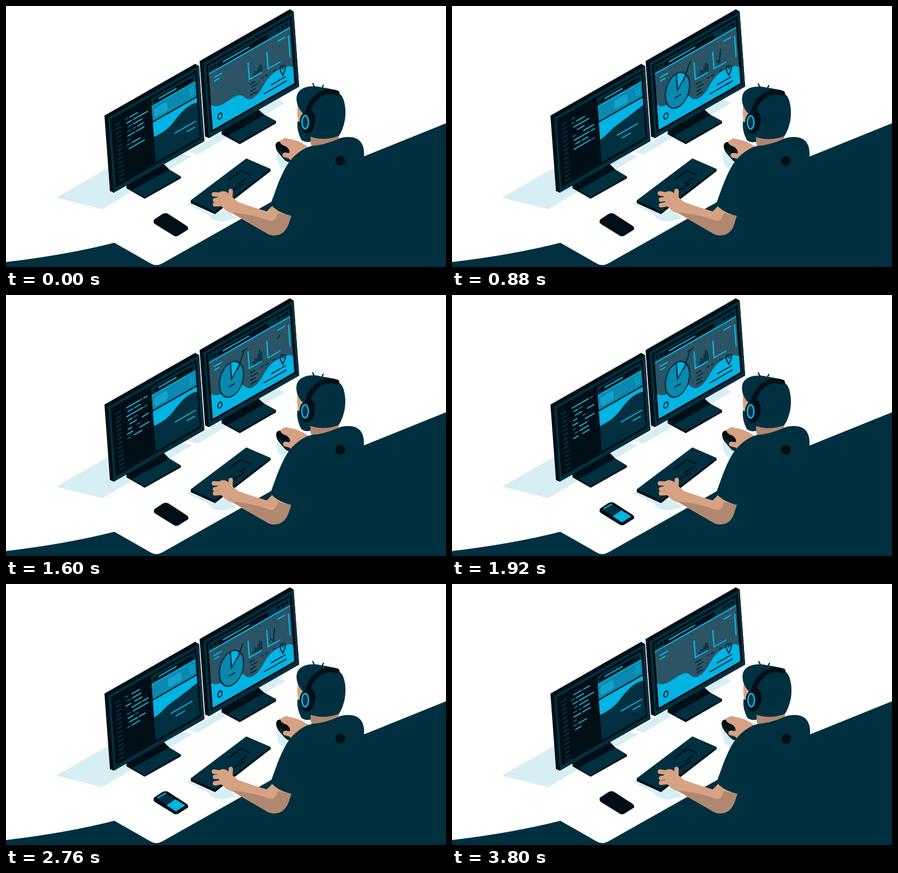
Animation, 800 px wide and 474 px high, one loop 3.84 s. Source, as an HTML page:

```html
<!DOCTYPE html>
<html lang="en">
<head>
<meta charset="utf-8">
<title>Developer at a desk</title>
<style>
html, body { margin: 0; width: 100%; height: 100%; overflow: hidden; background: #fff; }
svg { display: block; width: 800px; height: 474px; }
.n { fill: #003040; } .k { fill: #000f15; } .c { fill: #00b4e4; } .b { fill: #0a88ae; }
.p { fill: #d7eef3; } .s { fill: #d6a283; } .d { fill: #b08770; }
.l { fill: none; stroke-width: 2.4; stroke-linecap: round; stroke-linejoin: round; }
.lc { stroke: #00b4e4; } .ln { stroke: #003040; } .lk { stroke: #000f15; } .ls { stroke: #d6a283; }
</style>
</head>
<body>
<svg viewBox="0 0 800 474">
<defs>
  <clipPath id="codeClip"><path d="M5 16H76V127H5Z"/></clipPath>
  <clipPath id="pageClip"><path d="M77 9H157V125H77Z"/></clipPath>
</defs>

<!-- desk -->
<path class="p" d="M91 348L186 294L255 252L338 273L175 369ZM333 265L492 170L508 176L348 270Z"/>
<path class="n" d="M0 465Q110 452 197 430L262 467Q273 474 285 467L482 356L651 273L800 213V474H0Z"/>

<!-- left monitor -->
<path class="k" d="M219 326L284 289L318 310V313L252 350L219 331Z"/>
<path class="n" d="M219 328L284 290L318 309.500L252 347Z"/>
<path class="k" d="M219 323L285 285L297 297L230 334L219 329Z"/>
<path class="k" d="M179 199L344 105L351 109L360 246L196 339L189 336Z"/>
<g transform="matrix(1 -.57 .073 1 186 203)">
  <path class="n" d="M0 0H165V136H0Z"/>
  <path class="k" d="M4 5H160V129H4Z"/>
  <g clip-path="url(#codeClip)">
    <path id="nums" class="l" stroke="#06394a" style="stroke-width:2"/>
    <path id="dim" class="l" stroke="#0b5f78"/>
    <path id="code" class="l" stroke="#18a5cd"/>
  </g>
  <g clip-path="url(#pageClip)">
    <path class="n" d="M77 9H157V125H77Z"/>
    <path class="l lk" d="M88 17H145" style="stroke-width:8"/>
    <path class="l lc" d="M91 16.500H122"/>
    <ellipse class="k" cx="83" cy="17" rx="2.600" ry="3.200"/>
    <ellipse class="k" cx="151" cy="17" rx="2.600" ry="3.200"/>
    <path class="b" d="M77 24H157V50H77Z"/>
    <path class="c" d="M77 23H157V25H77Z"/>
    <rect id="card" y="30" width="24" height="16" rx="4" fill="#12a3cd"/>
    <path class="l lc" d="M145 31H153M145 35H153M145 39H153M145 43H153" style="stroke-width:1.500"/>
    <path id="hill" class="c"/>
    <path id="copy" class="l" stroke="#12a3cd"/>
  </g>
</g>

<!-- right monitor -->
<path class="k" d="M392 230L458 191L491 209V213L425 251L392 233Z"/>
<path class="n" d="M392 230L458 191L491 210L425 247Z"/>
<path class="k" d="M392 225L458 187L470 198L403 236L392 231Z"/>
<path class="k" d="M352 100L516 6L523 10L533 146L369 240L362 237Z"/>
<g transform="matrix(1 -.57 .073 1 359 104)">
  <path class="n" d="M0 0H164V136H0Z"/>
  <path class="k" d="M4 5H160V129H4Z"/>
  <path class="n" d="M8 9H156V25H8Z"/>
  <path fill="#2b5465" d="M8 23H156V125H8Z"/>
  <path class="c" d="M8 80C18 92 28 91 40 90S60 88 68 101S90 112 100 101S118 84 136 87S150 92 156 96V125H8Z"/>
  <path class="l lc" d="M9 24H155"/>
  <g class="k">
    <ellipse cx="13" cy="16" rx="2.600" ry="3.200"/><ellipse cx="20" cy="16" rx="2.600" ry="3.200"/>
    <ellipse cx="135" cy="16" rx="2.600" ry="3.200"/><ellipse cx="143" cy="16" rx="2.600" ry="3.200"/>
    <ellipse cx="150" cy="16" rx="2.600" ry="3.200"/>
  </g>
  <path class="l lk" d="M29 17.500H113" style="stroke-width:9"/>
  <path class="l lc" d="M35 17H81M17 35.500H30M17 42H25M133 35.500H145M152 37V75M78 44V74H100M112 44V74H133.500"/>
  <path class="l ln" d="M79 83H87M81 89.500H91M79 96H87M79 102.500H89M99.500 83.500H102M107 83.500H110M121.500 83.500H125M116 105H141M102 113.500H142"/>
  <ellipse class="l ln" cx="22" cy="108.500" rx="3.800" ry="5"/>
  <path id="bars" class="l ln" style="stroke-width:2.300;stroke-linecap:butt"/>
  <g id="pie">
    <ellipse class="b" rx="22" ry="30"/>
    <path class="c" d="M0 0V-30A22 30 0 0 1 17 -19Z"/>
    <path class="l ln" d="M17 -19L0 0V-30M-5 11H5"/>
    <ellipse class="l ln" rx="22" ry="30"/>
  </g>
  <g transform="translate(45.500 75)">
    <path id="call" class="l ln" pathLength="100" d="M12 -11L26 -38"/>
    <path id="stub" class="l ln"/>
  </g>
</g>
<path class="l ln" d="M503.500 126C500 120 498 117 498.500 113C499 108 507 106 508 111C508.500 116 505 120 503.500 126Z"/>
<ellipse class="n" cx="503.400" cy="113" rx="1.600" ry="2"/>
<path id="trace" class="l ln" pathLength="100" d="M481 99L486 104L488.500 77L492 83L497 74"/>

<!-- keyboard -->
<path class="p" d="M330 360L337 355L380 378L374 382Z"/>
<path class="p" d="M366 376Q372 392 396 391L418 386L405 370Z"/>
<path class="k" d="M336 353L437 277L481 296V300L380 378L336 358Z"/>
<path class="n" d="M336 353L437 277L481 296L380 373Z"/>
<path class="l lk" d="M405 316L427 299L445 307M423 323L437 313M409 337L434 322"/>

<!-- phone -->
<path class="p" d="M266 394L272 389L312 417L306 419Z"/>
<g id="phone">
  <path class="k" d="M269 388L284 378Q289 375 294 377L328 399Q332 402 331 406L315 416Q310 420 305 417L271 396Q267 393 269 388Z"/>
  <g id="glow">
    <path class="n" d="M274 389L290 380L325 402L309 413Z"/>
    <path class="c" d="M292 402L308 391L326 402L309 413Z"/>
    <path class="l lc" d="M276 388L290 380"/>
  </g>
</g>

<!-- mouse and right hand -->
<path class="p" d="M492 268Q492 292 508 298L520 280L500 262Z"/>
<g id="mouse">
  <path class="k" d="M490 253Q491 245 500 246L519 263L519 283Q512 286 504 277L494 265Q490 259 490 253Z"/>
  <path class="n" d="M493 257Q501 267 514 271L515 281Q508 282 503 275Z"/>
  <path class="s" d="M499 249Q496 244 503 242Q507 238 513 241Q532 243 551 257L522 283Q516 281 515 277L504 274Q500 268 507 266L515 267Q517 261 509 255Q502 253 499 249Z"/>
</g>

<!-- left arm -->
<path class="s" d="M384 341Q397 330 408 344L422 356Q450 366 474 373L487 360Q500 374 519 381Q514 400 506 409Q495 420 478 415L412 377Q395 372 388 358Z"/>
<path class="d" d="M411 375Q450 379 476 389Q490 395 494 376L519 381Q514 400 506 409Q495 420 478 415Z"/>
<path id="fingers" class="l ls" style="stroke-width:8"/>

<!-- person -->
<g id="body">
  <path class="d" d="M550 232H606L604 247Q578 262 555 253Z"/>
  <path class="n" d="M481 360L493 327C502 304 511 284 526 271Q540 258 556 254Q577 253 603 242C610 238 618 238 625 238C645 239 652 252 651 273L690 300V440H500L519 381Q494 376 481 360Z"/>
  <circle class="k" cx="608" cy="281" r="9"/>
</g>
<g id="head">
  <path class="s" d="M530 180H552V236H538Q528 210 530 180Z"/>
  <path class="n" d="M530 209Q540 214 553 218L554 246Q545 249 537 243Q528 226 530 209Z"/>
  <path class="n" d="M529 176Q525 156 541 149Q556 143 575 148Q600 150 611 164Q620 182 616 208Q612 227 605 236Q578 246 552 237L541 196Q532 188 529 176Z"/>
  <path class="l ln" d="M558 141Q560 148 567 150M577 144L573 152M604 171Q610 168 613 171"/>
  <path class="l lk" d="M548 195C553 171 576 148 602 158" style="stroke-width:9"/>
  <ellipse class="k" cx="549" cy="210" rx="13" ry="22" transform="rotate(8 549 210)"/>
  <ellipse class="k" cx="544" cy="211" rx="10" ry="17"/>
  <ellipse class="l lc" cx="544" cy="211" rx="6" ry="12" style="stroke-width:2.800;fill:#003040"/>
</g>
</svg>
<script>
const LOOP = 3840, HALF = 1920, STEP = 160, GAP = 7.8;
const el = id => document.getElementById(id);
const set = (id, name, value) => el(id).setAttribute(name, value);
const show = (id, on) => { el(id).style.display = on ? '' : 'none'; };
const clamp = x => Math.max(0, Math.min(1, x));
const ease = x => { x = clamp(x); return x * x * (3 - 2 * x); };
const ramp = (t, a, b) => ease((t - a) / (b - a));
const mix = (a, b, k) => a + (b - a) * k;
const hump = x => Math.sin(Math.PI * x) ** 2;

// Eased value between [time, value] stops.
function keys(t, stops) {
  for (let i = 1; i < stops.length; i++) {
    const [t0, v0] = stops[i - 1], [t1, v1] = stops[i];
    if (t < t1) return mix(v0, v1, ramp(t, t0, t1));
  }
  return stops[stops.length - 1][1];
}

// Code lines as start, length pairs.
const rows = [
  [30, 4, 38, 13], [32, 8, 44, 25], [34, 5, 43, 15], [32, 5, 42, 4, 50, 10],
  [32, 12, 48, 13], [31, 4], [30, 5, 39, 14], [33, 27],
  [39, 12], [30, 4, 50, 18], [32, 27, 63, 6], [34, 8, 46, 10],
  [31, 29, 63, 5], [34, 6, 44, 5], [36, 11, 58, 11], [32, 6, 49, 4],
  [30, 9, 53, 16], [30, 4, 42, 13], [33, 5, 42, 15], [30, 8, 46, 12],
  [40, 16, 60, 9], [31, 5, 42, 26], [32, 9, 45, 5], [34, 14, 52, 10]
];

function drawCode(t) {
  const s = t / STEP, k = Math.floor(s), off = ease((s - k - .6) / .4);
  let bright = '', dim = '', nums = '';
  for (let i = 0; i < 9; i++) {
    const v = 20 + GAP * (i - off), row = rows[(k + i) % rows.length];
    const limit = i < 8 ? 99 : 30 + 40 * off;
    for (let j = 0; j < row.length; j += 2) {
      const end = Math.min(row[j] + row[j + 1], limit);
      if (end <= row[j]) continue;
      const dash = `M${row[j]} ${v}H${end}`;
      if (row[j + 1] < 6) dim += dash; else bright += dash;
    }
  }
  for (let i = 0; i < 15; i++) nums += `M12 ${20 + GAP * (i - off)}H20`;
  set('code', 'd', bright);
  set('dim', 'd', dim);
  set('nums', 'd', nums);
}

function drawPage(p) {
  const k = ramp(p, 480, 760) - ramp(p, 1300, 1470);
  const m = (a, b) => mix(a, b, k);
  set('card', 'x', m(81, 106));
  set('hill', 'd', `M77 53H157V${m(62, 66)}C${m(140, 130)} ${m(55, 72)} ${m(126, 105)} ${m(64, 75)} ${m(114, 100)} ${m(72, 77)}S90 ${m(80, 82)} 77 ${m(79, 84)}Z`);
  set('copy', 'd', `M${m(115, 108)} 93H${m(152, 145)}M${m(136, 116)} 102.5H${m(149, 131)}`);
}

function drawCharts(t, p) {
  const size = ramp(t, 120, 540) - ramp(t, 3280, 3520);
  set('pie', 'transform', `translate(45.5 75) scale(${size})`);
  show('pie', size > .01);

  const call = ramp(t, 480, 860) - .25 * ramp(t, 2660, 2760) - .75 * ramp(t, 2760, 3040);
  set('call', 'stroke-dasharray', `${100 * call} 300`);
  show('call', call > .01);
  const stub = ramp(t, 900, 1060) - ramp(t, 2520, 2680);
  set('stub', 'd', stub > .01 ? `M${26 - 4 * stub} -38H${26 + 5 * stub}` : '');

  const lift = 1 + .5 * hump(t / LOOP);
  set('bars', 'd', [4, 7, 6, 10, 14, 11].map((h, i) => `M${86 + 3 * i} 72V${72 - h * lift}`).join(''));

  const tip = keys(p, [[600, 0], [860, 62], [1120, 69], [1260, 100]]);
  const tail = keys(p, [[840, 0], [1280, 53], [1480, 82], [1740, 100]]);
  set('trace', 'stroke-dasharray', `${Math.max(0, tip - tail)} 300`);
  set('trace', 'stroke-dashoffset', -tail);
  show('trace', tip - tail > .5);
}

function drawPerson(t) {
  const sway = t > 360 && t < 2440 ? -hump((t - 360) / 1040) : 0;
  set('body', 'transform', `translate(${sway} 0)`);
  set('head', 'transform', `translate(${sway} ${-.4 * sway})`);
  const x = keys(t, [[0, 0], [560, 0], [840, 4], [1000, 4], [1240, 1], [2800, 1], [3300, -1], [3840, 0]]);
  set('mouse', 'transform', `translate(${x} ${x * .2})`);
  const tap = i => 1.7 * Math.sin(2 * Math.PI * (t / 320 + i * .31));
  set('fingers', 'd',
    `M393 343L378 ${342 + tap(0)}M393 350L380 ${351 + tap(1)}M397 359L380 ${361 + tap(2) * .6}M408 346L${409 + tap(3) * .5} 336`);
}

function drawPhone(t) {
  const on = ramp(t, 1600, 1760) - ramp(t, 3520, 3700);
  set('glow', 'opacity', on);
  const shake = t > 1560 && t < 1880 ? Math.sin(Math.PI * (t - 1560) / 80) : 0;
  set('phone', 'transform', `translate(${shake * .6} ${shake})`);
}

function draw(now) {
  const t = now % LOOP, p = t % HALF;
  drawCode(t);
  drawPage(p);
  drawCharts(t, p);
  drawPerson(t);
  drawPhone(t);
}

const start = performance.now();
function tick() {
  draw(Math.floor((performance.now() - start) / 40) * 40);
  requestAnimationFrame(tick);
}
tick();
</script>
</body>
</html>
```
